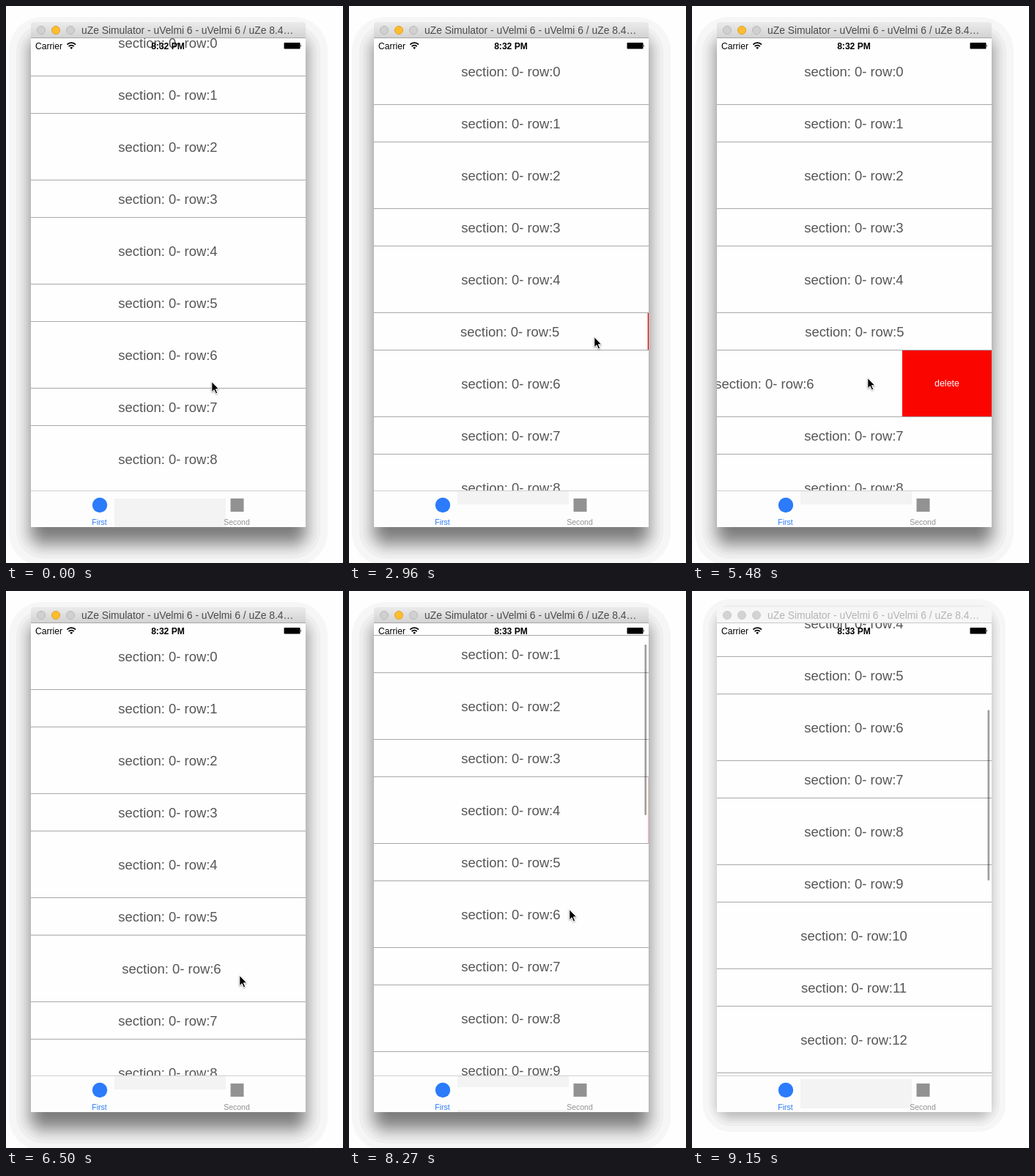
An HTML page that plays this animation: 460 px wide and 760 px high, repeating every 9.22 s.

```html
<!DOCTYPE html>
<html lang="en">
<head>
<meta charset="utf-8">
<title>Swipeable table</title>
<style>
  html, body { margin: 0; width: 100%; height: 100%; overflow: hidden; background: #fefefe; }
  svg { display: block; width: 460px; height: 760px; }
  text { font-family: "Liberation Sans", Arial, sans-serif; }
  .mid { text-anchor: middle; }
  .row { font-size: 18.45px; fill: #555; }
  .btn { font-size: 12.5px; fill: #fff; }
  .tab { font-size: 10.5px; }
  .status { font-size: 12.1px; fill: #000; }
  .title { font-size: 13.85px; fill: #4a4a4a; }
  .lamp { fill: #d0d0d0; stroke: #b9b9b9; }
  .lamp.on { fill: #fdbd2e; stroke: #e0a030; }
  #edge { fill: #a6a6a6; }
  .idle .title { fill: #b4b4b4; }
  .idle .lamp { fill: #d3d3d3; stroke: #cacaca; }
  .idle #head { fill: #f6f6f6; }
  .idle #edge { fill: #c8c8c8; }
  #soft, .idle #deep { display: none; }
  .idle #soft { display: inline; }
  #arrow { filter: drop-shadow(0 1px 1px rgba(0, 0, 0, .35)); }
</style>
</head>
<body>
<svg id="stage" viewBox="0 0 460 760">
  <defs>
    <linearGradient id="steel" x2="0" y2="1">
      <stop stop-color="#ebebeb"/><stop offset="1" stop-color="#d2d2d2"/>
    </linearGradient>
    <clipPath id="listClip"><rect x="34" y="44" width="375" height="618"/></clipPath>
    <clipPath id="tabClip"><rect x="34" y="662" width="375" height="49"/></clipPath>
  </defs>
  <g id="deep"></g>
  <g id="soft"></g>

  <rect x="34" y="40" width="375" height="671" fill="#fefefe"/>
  <g clip-path="url(#listClip)"><g id="list"></g></g>
  <rect id="bar" x="403.5" width="2.6" height="233" rx="1.3" fill="#000" fill-opacity=".38"/>

  <path id="head" d="M34 44V26q0-4 4-4H405q4 0 4 4V44z" fill="url(#steel)"/>
  <rect id="edge" x="34" y="43" width="375" height="1"/>
  <circle class="lamp" cx="48" cy="33" r="5.5"/>
  <circle class="lamp on" cx="68" cy="33" r="5.5"/>
  <circle class="lamp" cx="88" cy="33" r="5.5"/>
  <text class="title" x="103" y="38">uZe Simulator - uVelmi 6 - uVelmi 6 / uZe 8.4…</text>

  <text class="status" x="40" y="59">Carrier</text>
  <g fill="none" stroke="#000" stroke-width="1.8">
    <path d="M83.4 52.6a8 8 0 0 1 11.6 0M85.6 55.2a5 5 0 0 1 7.2 0"/>
    <path d="M89.2 59l-2-2.2a3 3 0 0 1 4 0z" fill="#000" stroke="none"/>
  </g>
  <text id="clock" class="status mid" x="221" y="59" font-weight="bold"></text>
  <rect x="379.5" y="50" width="22" height="8.6" rx="1"/>
  <path d="M402.2 52.5q1.7 1.7 0 3.5z"/>

  <rect x="34" y="661" width="375" height="50" fill="#fdfdfd"/>
  <g clip-path="url(#tabClip)"><g id="ghosts" fill="#f3f3f3"></g></g>
  <rect x="34" y="661" width="375" height="1" fill="#d0d0d0"/>
  <g fill="#2b7bfb">
    <circle cx="128" cy="681" r="10.2"/>
    <text class="tab mid" x="127.5" y="708">First</text>
  </g>
  <g fill="#929292">
    <rect x="306.5" y="672" width="18" height="18"/>
    <text class="tab mid" x="315" y="708">Second</text>
  </g>

  <path id="arrow" d="M0 0V14.2L3.3 11.2 5.6 16.5 7.9 15.5 5.6 10.3H10z" stroke="#fff"/>
</svg>
<script>
const LOOP = 9220, START = 750, STEP = 147.4, LAST = 57;
const LEFT = 34, RIGHT = 409, TOP = 44, BUTTON = 60;
const $ = id => document.getElementById(id);

// Times below are counted in screen updates (STEP ms each).
const swipes = {
  4: { from: 41, extra: 50, shut: 45 },
  5: { from: 14.7, extra: 11, shut: 28 },
  6: { from: 28, extra: 62, shut: 37 }
};

// Pointer stops: [time, x, y].
const stops = [[-1, 281, 513], [1, 281, 405], [6, 281, 447], [15, 335, 452],
  [20, 262, 452], [27, 359, 506], [32, 240, 508], [39, 319, 525], [42, 340, 370],
  [44, 230, 370], [47, 301, 500], [51, 301, 435], [52, 301, 435], [LAST, 301, 320]];

function ease(k, a, b) {
  const u = Math.min(1, Math.max(0, (k - a) / (b - a)));
  return u * u * (3 - 2 * u);
}

// Falls from 1 to 0 with a small swing past the rest position.
function spring(k, from) {
  const t = Math.max(0, k - from);
  return Math.exp(-0.9 * t) * Math.cos(1.05 * t);
}

function swing(k, a, b) {
  return k > a && k < b ? Math.sin(Math.PI * (k - a) / (b - a)) : 0;
}

function scrollAt(k) {
  const y = -39 * spring(k, 2.5) - 74 * ease(k, 47, 51) - 255 * ease(k, 52, LAST);
  return Math.round(y * 2) / 2;
}

function swipeAt({ from, extra, shut }, k) {
  const pull = BUTTON * ease(k, from, from + 3.5) + extra * swing(k, from + 1, from + 7);
  return -pull * spring(k, shut);
}

function pointerAt(k) {
  const i = Math.max(1, stops.findIndex(s => s[0] >= k));
  const [a, ax, ay] = stops[i - 1], [b, bx, by] = stops[i], u = ease(k, a, b);
  return [ax + (bx - ax) * u, ay + (by - ay) * u];
}

function add(parent, tag, attrs, text) {
  const el = document.createElementNS('http://www.w3.org/2000/svg', tag);
  for (const key in attrs) el.setAttribute(key, attrs[key]);
  if (text) el.textContent = text;
  return parent.appendChild(el);
}

// Posterized window shadow: contours of a soft edge at equal grey steps.
function shadow(parent, reach, drop, peak) {
  const step = 8 / 255 / peak;
  const contour = level => Math.log(1 / level - 1);
  const spread = reach / contour(step / 2);
  for (let level = step / 2; level < 1; level += step) {
    const d = spread * contour(level);
    if (d < -drop) break;
    const g = Math.round(254 * (1 - peak * (level + step / 2)));
    add(parent, 'rect', {
      x: LEFT - d, y: 22 + drop - d, width: 375 + 2 * d, height: 689 + 2 * d,
      rx: Math.max(4, 22 + d * 0.8), fill: `rgb(${g},${g},${g})`
    });
  }
}

function buildRows() {
  const list = $('list'), cells = {};
  let y = TOP;
  for (let n = 0; n < 15; n++) {
    const h = n % 2 ? 51 : 91, mid = y + (h - 1) / 2;
    const label = add(list, 'text', { class: 'row mid', x: 221, y: mid + 6.5 }, `section: 0- row:${n}`);
    if (swipes[n]) {
      const fill = add(list, 'rect', { y, height: h - 1, fill: '#fb0500' });
      const word = add(list, 'text', { class: 'btn mid', y: mid + 4.3 }, 'delete');
      cells[n] = { label, fill, word };
    }
    add(list, 'rect', { x: LEFT, y: y + h - 1, width: 375, height: 1, fill: '#a8a8a8' });
    add($('ghosts'), 'rect', { x: 148, y: mid - 17, width: 152, height: 40 });
    y += h;
  }
  return cells;
}

shadow($('deep'), 30, 23, 0.55);
shadow($('soft'), 19, 8, 0.32);
const cells = buildRows();

function moveCell({ label, fill, word }, dx) {
  const open = Math.max(0, -dx), w = Math.max(open, BUTTON);
  label.setAttribute('x', 221 + dx);
  fill.setAttribute('x', RIGHT - open);
  fill.setAttribute('width', w);
  word.setAttribute('x', RIGHT - open + w / 2);
}

function draw(k) {
  const off = scrollAt(k), [x, y] = pointerAt(k), idle = k >= LAST;
  for (const id of ['list', 'ghosts']) $(id).setAttribute('transform', `translate(0 ${off})`);
  for (const n in cells) moveCell(cells[n], swipeAt(swipes[n], k));

  $('bar').setAttribute('y', 47 - off * 0.35);
  $('bar').setAttribute('opacity', ease(k, 1, 2) - ease(k, 7, 10) + ease(k, 47, 48));
  $('clock').textContent = k < 42 ? '8:32 PM' : '8:33 PM';
  $('arrow').setAttribute('transform', `translate(${x - 0.2} ${y - 0.5})`);
  $('arrow').setAttribute('visibility', idle ? 'hidden' : 'visible');
  $('stage').classList.toggle('idle', idle);
}

let last = null;
const begin = performance.now();
function tick() {
  const t = (performance.now() - begin) % LOOP;
  const k = Math.max(-1, Math.min(LAST, Math.floor((t - START + 5) / STEP)));
  if (k !== last) draw(last = k);
  requestAnimationFrame(tick);
}
tick();
</script>
</body>
</html>
```
